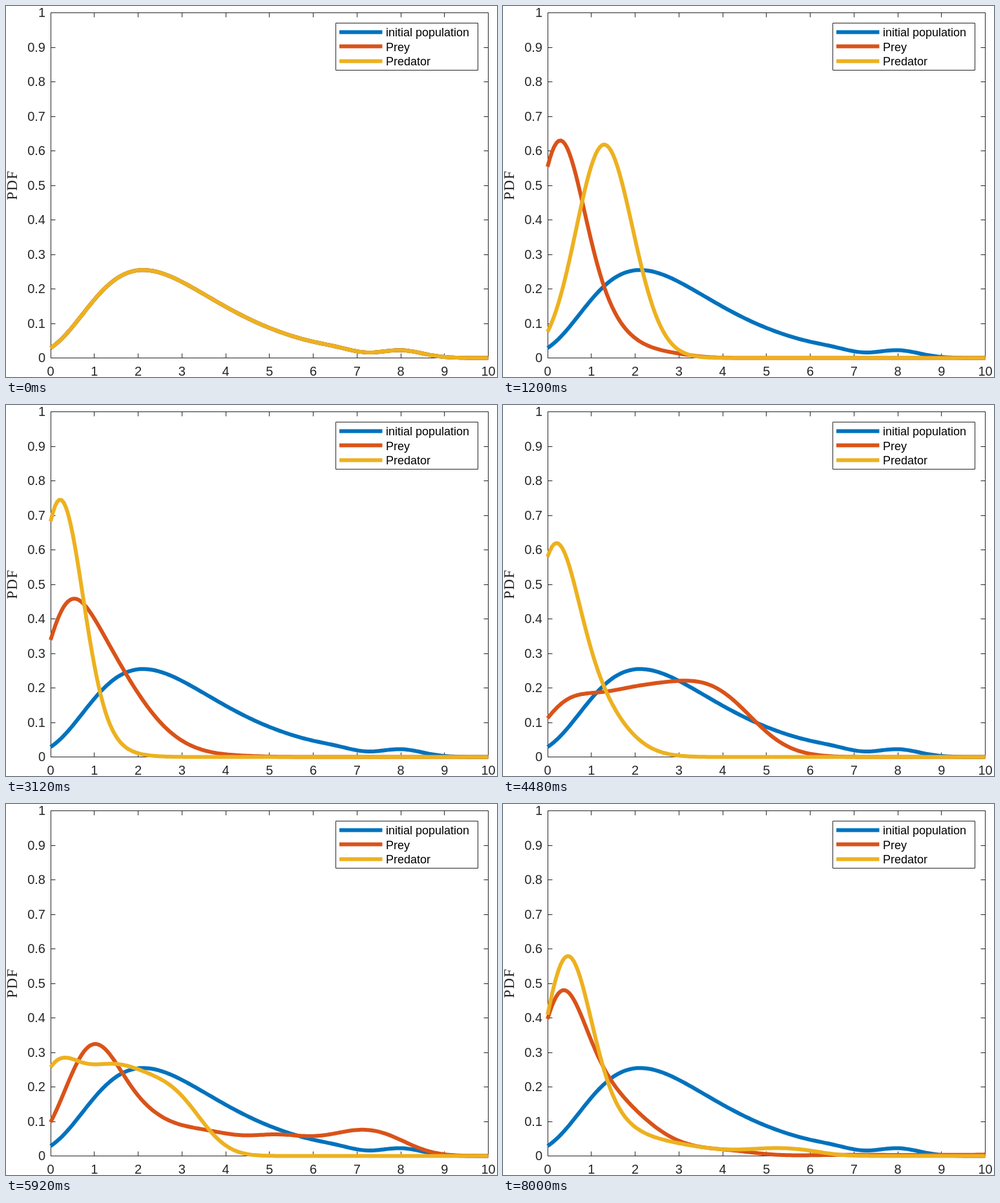
Write an HTML page that moves like this. It is 760 px wide and 575 px high and loops after 8080 ms.

```html
<!DOCTYPE html>
<html lang="en">
<head>
<meta charset="utf-8">
<title>Population densities</title>
<style>
  html, body { margin: 0; width: 100%; height: 100%; overflow: hidden; background: #fff; }
  svg { display: block; }
  text { font-family: "Liberation Sans", Arial, sans-serif; font-size: 20px; fill: #262626; }
  .legend { font-size: 18px; fill: #000; }
  .ylabel { font-family: "Liberation Serif", "Times New Roman", serif; font-size: 23px; letter-spacing: 1.5px; }
  .axis { fill: none; stroke: #262626; stroke-width: 1; }
  .curve { fill: none; stroke-width: 6; stroke-linejoin: round; }
</style>
</head>
<body>
<svg id="stage" width="760" height="575" viewBox="0 0 760 575"></svg>
<script>
const FRAME_MS = 80, FRAMES = 101;
const LEFT = 69, RIGHT = 746.5, TOP = 10.5, BOTTOM = 545.5, X_MAX = 10;
const BLUE = '#0072BD', RED = '#D95319', YELLOW = '#EDB120';

// Predator-prey rates, and the time that passes in one frame.
const BIRTH = 1, HUNTING = 1.1, FEEDING = .6, DEATH = 1.1;
const FRAME_TIME = .1, SUBSTEPS = 5;

const BANDWIDTH = .5, LEVELS = 36, CURVE_POINTS = 200;

const toX = x => LEFT + (RIGHT - LEFT) * x / X_MAX;
const toY = p => BOTTOM - (BOTTOM - TOP) * p;

// Quantile of the gamma distribution with shape 3 and scale 1, by bisection.
function gammaQuantile(q) {
  let low = 0, high = 30;
  for (let i = 0; i < 40; i++) {
    const x = (low + high) / 2;
    if (1 - Math.exp(-x) * (1 + x + x * x / 2) < q) low = x; else high = x;
  }
  return low;
}

// Every pairing of initial prey and predator sizes is one habitat.
function createHabitats() {
  const sizes = Array.from({ length: LEVELS }, (_, i) => gammaQuantile((i + .5) / LEVELS));
  return sizes.flatMap(prey => sizes.map(predator => ({ prey, predator })));
}

// Leapfrog steps on the logarithms of both sizes.
function advance({ prey, predator }) {
  const dt = FRAME_TIME / SUBSTEPS;
  for (let i = 0; i < SUBSTEPS; i++) {
    predator *= Math.exp((FEEDING * prey - DEATH) * dt / 2);
    prey *= Math.exp((BIRTH - HUNTING * predator) * dt);
    predator *= Math.exp((FEEDING * prey - DEATH) * dt / 2);
  }
  return { prey, predator };
}

// Gaussian kernel density estimate as a path.
function densityPath(values) {
  const scale = 1 / (values.length * BANDWIDTH * Math.sqrt(2 * Math.PI));
  const points = [];
  for (let i = 0; i <= CURVE_POINTS; i++) {
    const x = X_MAX * i / CURVE_POINTS;
    let sum = 0;
    for (const value of values) {
      const z = (x - value) / BANDWIDTH;
      if (z * z < 25) sum += Math.exp(-z * z / 2);
    }
    points.push(toX(x).toFixed(2) + ' ' + toY(sum * scale).toFixed(2));
  }
  return 'M' + points.join('L');
}

function label(text, x, y, anchor, extra = '') {
  return `<text x="${x}" y="${y}" text-anchor="${anchor}" ${extra}>${text}</text>`;
}

function legendRow(name, color, lineY, baseline) {
  return `<path class="curve" stroke="${color}" d="M516 ${lineY}H582.5"/>` +
    label(name, 588, baseline, 'start', 'class="legend"');
}

function buildChart() {
  const axisX = LEFT + .5;
  let ticks = '', labels = '';
  for (let k = 0; k <= 10; k++) {
    const x = Math.floor(toX(k)) + .5, y = Math.floor(toY(k / 10)) + .5;
    ticks += `M${x} ${BOTTOM}v-7M${x} ${TOP}v7M${axisX} ${y}h7M${RIGHT} ${y}h-7`;
    labels += label(k, toX(k), 573, 'middle') + label(k / 10, 61, y + 6.5, 'end');
  }
  const curves = [BLUE, RED, YELLOW].map(color => `<path class="curve plot" stroke="${color}"/>`).join('');

  document.getElementById('stage').innerHTML =
    `<path class="axis" d="M${axisX} ${TOP}H${RIGHT}V${BOTTOM}H${axisX}Z${ticks}"/>` + labels +
    label('PDF', 0, 0, 'middle', 'class="ylabel" transform="translate(17 277.5) rotate(-90)"') +
    curves + '<path class="axis" d="M510.5 26.5H730.5V99.5H510.5Z"/>' +
    legendRow('initial population', BLUE, 40.5, 47) +
    legendRow('Prey', RED, 62.5, 70) +
    legendRow('Predator', YELLOW, 85.5, 92);
}

buildChart();
const [initialPath, preyPath, predatorPath] = document.querySelectorAll('.plot');

const history = [createHabitats()];
while (history.length < FRAMES) history.push(history.at(-1).map(advance));

initialPath.setAttribute('d', densityPath(history[0].map(h => h.prey)));

let start, shown = -1;
function draw(now) {
  start ??= now;
  const frame = Math.max(0, Math.floor((now - start) / FRAME_MS)) % FRAMES;
  if (frame !== shown) {
    shown = frame;
    preyPath.setAttribute('d', densityPath(history[frame].map(h => h.prey)));
    predatorPath.setAttribute('d', densityPath(history[frame].map(h => h.predator)));
  }
  requestAnimationFrame(draw);
}
draw(performance.now());
</script>
</body>
</html>
```
